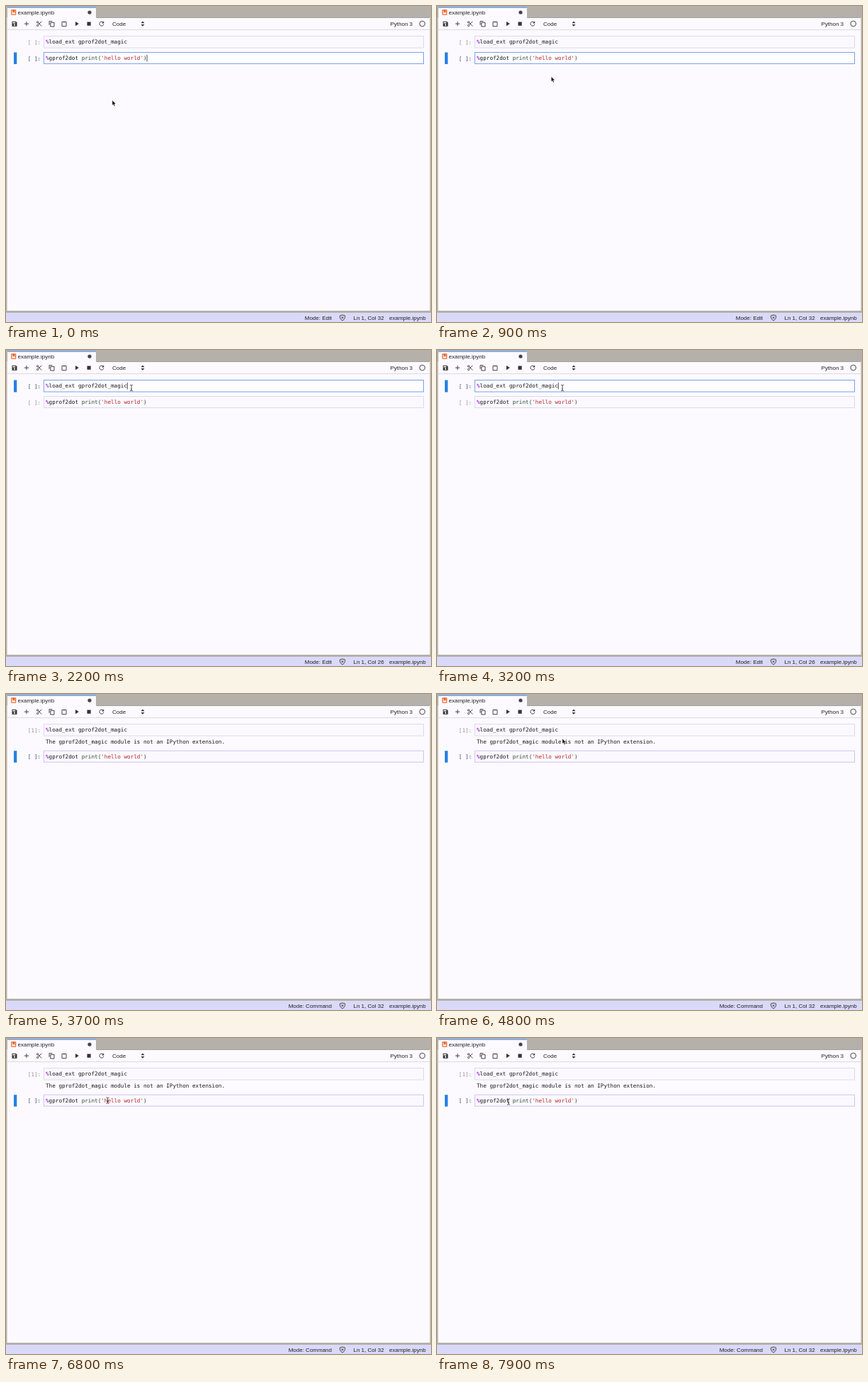
An HTML page for the animation above (8 s loop, 600 by 446 pixels).

```html
<!DOCTYPE html>
<html lang="en">
<head>
<meta charset="utf-8">
<title>Notebook</title>
<style>
html, body { margin: 0; width: 100%; height: 100%; overflow: hidden; background: #b5b1aa; }
svg { display: block; width: 600px; height: 446px; }
text { font: 8px "Liberation Sans", Arial, sans-serif; fill: #222; white-space: pre; }
.code text { font: 7.65px "DejaVu Sans Mono", monospace; fill: #181818; }
.code .prompt { fill: #92929a; }
.code .active .prompt { fill: #3c4878; }
.op { fill: #a028d8; font-weight: bold; }
.fn { fill: #2c4a30; }
.str { fill: #b42424; }
.box { fill: #fbf9ff; stroke: #dcdaee; }
.active .box { stroke: #c8c6f0; }
.edit .box { fill: #fefdff; stroke: #7b9fec; }
.bar { fill: #2580e4; visibility: hidden; }
.active .bar { visibility: visible; }
.line { fill: none; stroke: #444; stroke-width: 1; }
.solid { fill: #333; }
</style>
</head>
<body>
<svg viewBox="0 0 600 446">
  <rect width="600" height="446" fill="#b5b1aa"/>
  <rect x="1.5" y="16" width="597" height="414" fill="#fcfaff"/>
  <path d="M2 17V1.5H127V17Z" fill="#fcfaff"/>
  <path d="M2 2H127" stroke="#6a9be0" stroke-width="1.6"/>
  <path d="M127 16.5H598" stroke="#a5a29d"/>
  <path d="M2 33.5H598" stroke="#dddbe3"/>
  <rect y="433" width="600" height="13" fill="#dad9fa"/>

  <rect x="7.7" y="5.7" width="6" height="6.4" rx=".6" fill="none" stroke="#ec6a32" stroke-width="1.2"/>
  <path d="M9.3 6H12.6V10L11 8.7L9.3 10Z" fill="#ec6a32"/>
  <text x="16.5" y="12">example.ipynb</text>
  <circle cx="118" cy="9" r="2.6" fill="#444"/>

  <!-- toolbar -->
  <path class="solid" fill-rule="evenodd" d="M8.5 21.7H14L15.5 23.2V28.7H8.5ZM9.5 22.7V24.5H13.3V22.7ZM12 25.4A1.2 1.2 0 1 0 12 27.8A1.2 1.2 0 1 0 12 25.4Z"/>
  <path class="line" d="M29 22V28.2M25.9 25.1H32.1"/>
  <g class="line">
    <circle cx="44.6" cy="22.9" r="1.2"/><circle cx="44.6" cy="27.5" r="1.2"/>
    <path d="M45.5 23.7L50.3 28.5M45.5 26.7L50.3 21.8"/>
    <path d="M61 26.8V21.6H65.5M62.8 23.4H68V29H62.8Z"/>
    <path d="M79 22.3H85V28.7H79ZM80.5 22.7H83.5" stroke-width="1"/>
    <path d="M137.3 23.2A3 3 0 1 0 137.9 25.8"/>
  </g>
  <path class="solid" d="M98 22L102.8 25.1L98 28.2ZM114.5 22.5H119.7V27.7H114.5ZM138.2 21.6V24.6H135.2ZM190.5 24.2L193 21.5L195.5 24.2ZM190.5 26.1H195.5L193 28.8Z"/>
  <text x="150" y="28">Code</text>
  <text x="574" y="28" text-anchor="end">Python 3</text>
  <circle class="line" cx="587.7" cy="25" r="3.8" stroke-width=".9"/>

  <g class="code">
    <g id="first">
      <rect class="bar" x="11" y="42.5" width="4.3" height="17"/>
      <rect class="box" x="53.5" y="42.5" width="536" height="16.5"/>
      <text class="prompt" x="30.8" y="53.7" id="count"></text>
      <text x="56" y="53.3"><tspan class="op">%</tspan>load_ext gprof2dot_magic</text>
    </g>
    <text id="output" x="56" y="69.7">The gprof2dot_magic module is not an IPython extension.</text>
    <g id="second">
      <rect class="bar" x="11" y="65.5" width="4.3" height="16.5"/>
      <rect class="box" x="53.5" y="65.5" width="536" height="16"/>
      <text class="prompt" x="30.8" y="76.5">[ ]:</text>
      <text x="56" y="76"><tspan class="op">%</tspan>gprof2dot <tspan class="fn">print(</tspan><tspan class="str">'hello world'</tspan><tspan class="fn">)</tspan></text>
    </g>
  </g>
  <path id="caret" d="M0 0V9.5" stroke="#222" stroke-width=".8"/>

  <text id="mode" x="460" y="443" text-anchor="end"></text>
  <path class="line" d="M475 436L478.7 437.2C478.9 440.4 477.6 442.7 475 444C472.4 442.7 471.1 440.4 471.3 437.2ZM473.6 438.4L476.4 441.2M476.4 438.4L473.6 441.2" stroke-width=".9"/>
  <text id="place" x="490.5" y="443"></text>
  <text x="541" y="443">example.ipynb</text>

  <g id="pointer">
    <circle id="press" r="9.7" fill="#fff" fill-opacity=".55" stroke="#222" stroke-width="1.1"/>
    <path id="arrow" d="M0 0V7.2L1.6 5.7L2.8 8.4L4.1 7.8L2.9 5.2H5.1Z" fill="#111" stroke="#fff" stroke-width=".4"/>
    <path id="beam" d="M-2 -3.8Q0 -3.8 0 -2.6Q0 -3.8 2 -3.8M0 -2.8V3.8M-2 4.8Q0 4.8 0 3.6Q0 4.8 2 4.8M-1 2H1" fill="none" stroke="#333" stroke-width=".8"/>
  </g>
</svg>
<script>
const LOOP = 8000, CLICK = 1700, RUN = 3500, REAPPEAR = 4600, BLINK = 530;
// time, x, y
const path = [
  [0, 150, 133], [500, 150, 133], [1400, 177, 53], [4500, 177, 53],
  [4800, 177, 63], [5100, 177, 63], [5800, 174, 86.5], [6400, 174, 86.5],
  [7300, 101, 89.5], [LOOP, 101, 89.5]
];
const $ = id => document.getElementById(id);
const show = (id, on) => $(id).setAttribute('visibility', on ? 'visible' : 'hidden');
const move = (id, x, y) => $(id).setAttribute('transform', `translate(${x} ${y})`);
const label = (id, text) => { if ($(id).textContent !== text) $(id).textContent = text; };
const ease = u => u * u * (3 - 2 * u);

function pointerAt(t) {
  const i = path.findIndex(p => p[0] > t);
  const [t0, x0, y0] = path[i - 1], [t1, x1, y1] = path[i];
  const u = ease((t - t0) / (t1 - t0));
  return [x0 + (x1 - x0) * u, y0 + (y1 - y0) * u];
}

function draw(t) {
  const onFirst = t >= CLICK && t < RUN, done = t >= RUN;
  const shift = done ? 14.7 : 0;
  $('first').setAttribute('class', onFirst ? 'active edit' : '');
  $('second').setAttribute('class', onFirst ? '' : done ? 'active' : 'active edit');
  move('second', 0, shift);
  show('output', done);
  label('count', done ? '[1]:' : '[ ]:');
  label('mode', done ? 'Mode: Command' : 'Mode: Edit');
  label('place', onFirst ? 'Ln 1, Col 26' : 'Ln 1, Col 32');

  const sinceFocus = onFirst ? t - CLICK : t;
  show('caret', !done && Math.floor(sinceFocus / BLINK) % 2 === 0);
  move('caret', onFirst ? 171.3 : 199, onFirst ? 46 : 69);

  const [x, y] = pointerAt(t);
  const visible = t < RUN || t >= REAPPEAR;
  const inCell = (y > 42 && y < 59) || (y > 65 + shift && y < 82 + shift);
  move('pointer', x, y);
  show('arrow', visible && !inCell);
  show('beam', visible && inCell);
  show('press', t >= 1500 && t < CLICK);
}

const start = performance.now();
function tick() {
  const t = (performance.now() - start) % LOOP;
  draw(Math.floor(t / 100) * 100);
  requestAnimationFrame(tick);
}
tick();
</script>
</body>
</html>
```
